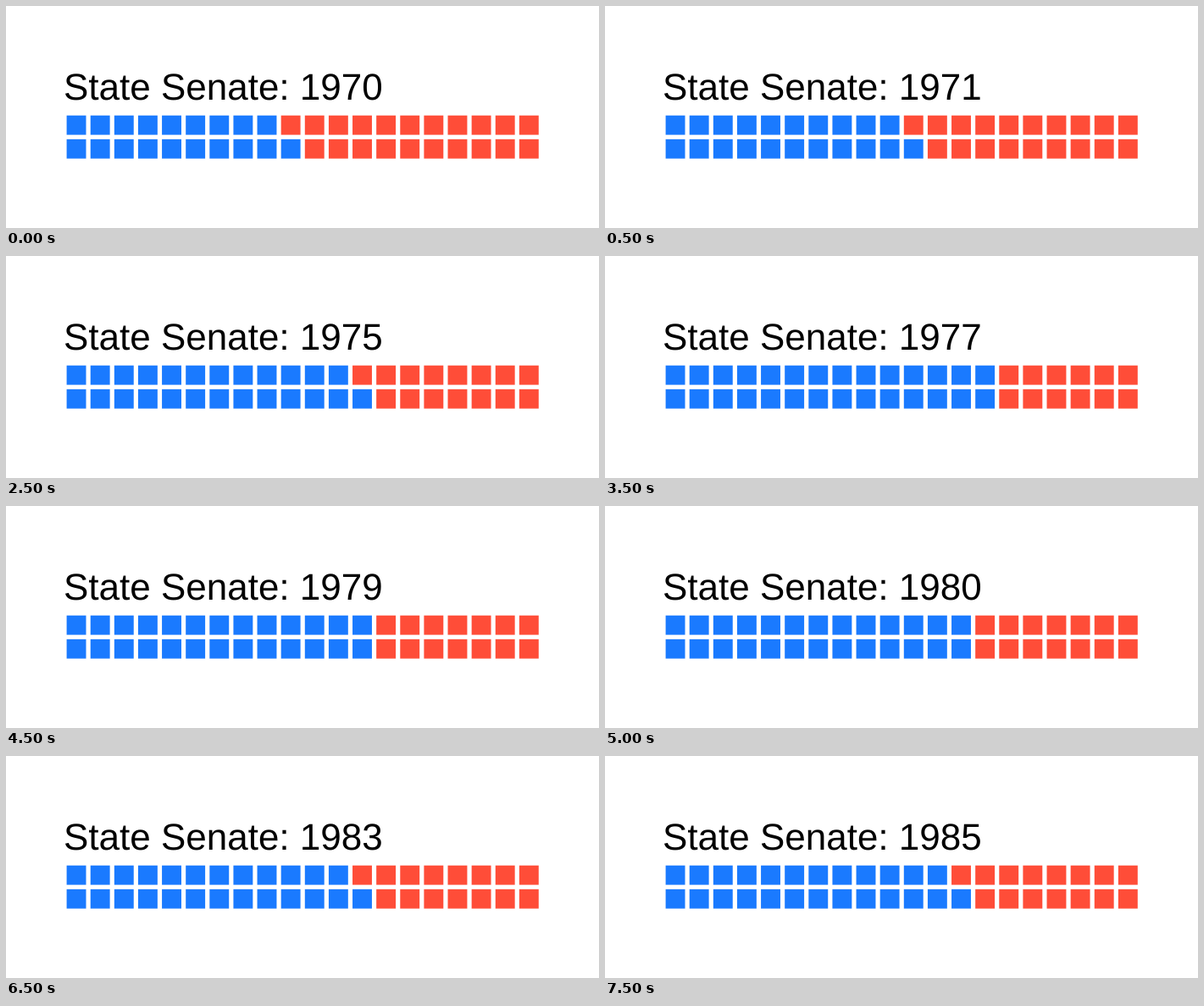
A matplotlib script for the animation above (8 s loop, 700 by 263 pixels).

```python
import matplotlib.pyplot as plt
from matplotlib.animation import FuncAnimation
from matplotlib.patches import Rectangle

W, H, DPI = 700, 263, 64
BLUE, RED = "#1a7aff", "#ff4d38"
COLS, ROWS = 20, 2
LEFT, TOP, PITCH, SIZE = 71.6, 129.7, 28.12, 22.9
FIRST_YEAR, YEARS, STEP_MS = 1970, 16, 500

# Blue seats from the given year onwards
SEATS = {1970: 19, 1971: 21, 1973: 20, 1975: 25, 1977: 28, 1979: 26, 1983: 25}

plt.rcParams["text.hinting"] = "none"
plt.rcParams["text.hinting_factor"] = 8

fig = plt.figure(figsize=(W / DPI, H / DPI), dpi=DPI, facecolor="white")
ax = fig.add_axes([0, 0, 1, 1])
ax.set_xlim(0, W)
ax.set_ylim(H, 0)
ax.axis("off")

title = ax.text(68, 111.5, "", family="Liberation Sans", color="black",
                fontsize=44 * 72 / DPI, ha="left", va="baseline")


def add_seat(col, row):
    seat = Rectangle((LEFT + col * PITCH, TOP + row * PITCH), SIZE, SIZE,
                     linewidth=0, snap=False)
    return ax.add_patch(seat)


# Columns fill from the left, the lower seat before the upper one
seats = [add_seat(col, row) for col in range(COLS) for row in reversed(range(ROWS))]


def blue_seats(year):
    return SEATS[max(y for y in SEATS if y <= year)]


def draw(i):
    year = FIRST_YEAR + i
    title.set_text(f"State Senate: {year}")
    blue = blue_seats(year)
    for n, seat in enumerate(seats):
        seat.set_facecolor(BLUE if n < blue else RED)
    return [title, *seats]


anim = FuncAnimation(fig, draw, frames=YEARS, interval=STEP_MS,
                     repeat=True, repeat_delay=0, blit=False)
plt.show()
```
